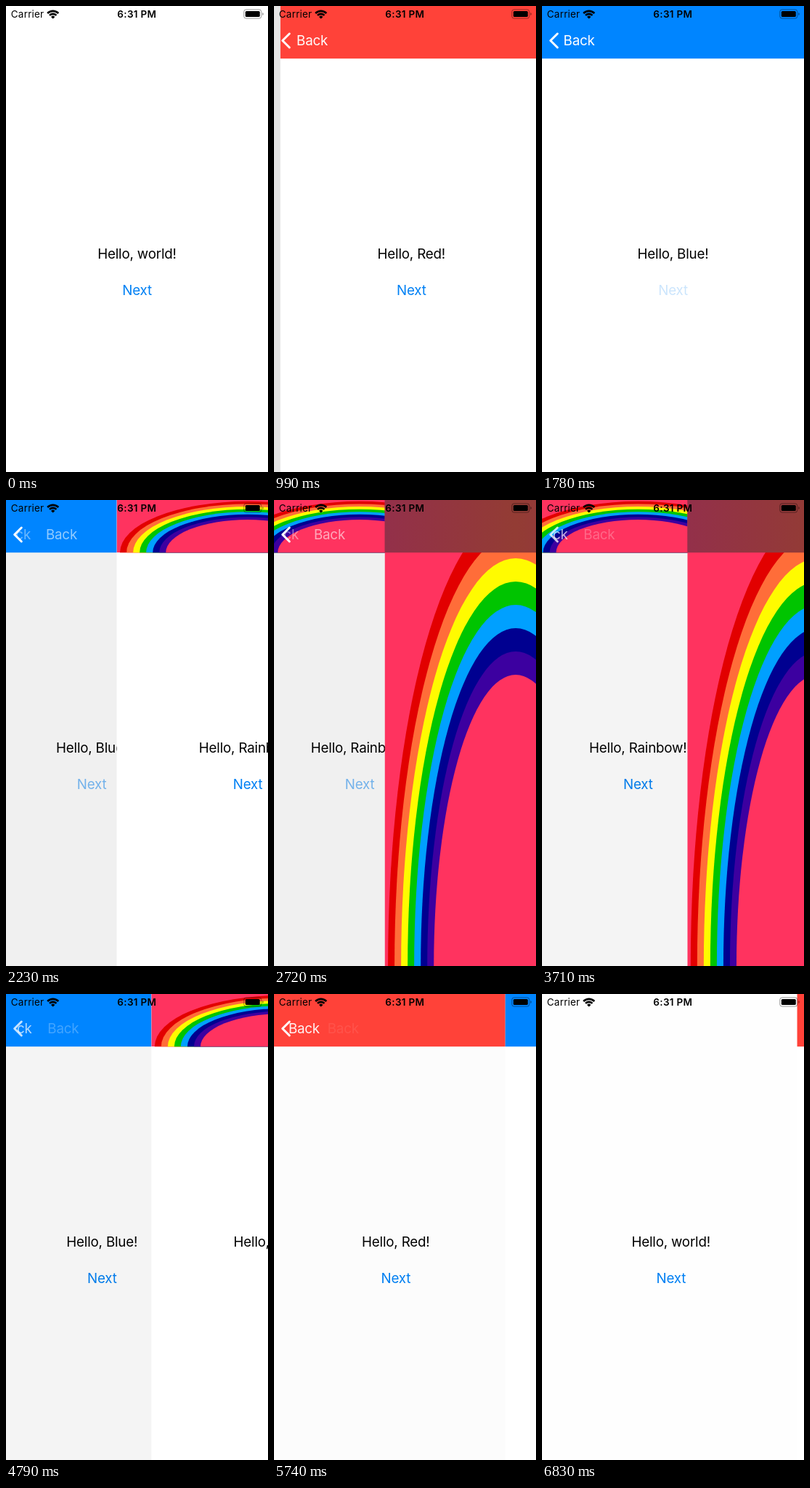
Recreate the animation shown at these times as an HTML page. Size 361 by 640 pixels, loop 6.93 s.

```html
<!DOCTYPE html>
<html lang="en">
<head>
<meta charset="utf-8">
<title>Navigation bar styles</title>
<style>
  html, body { margin: 0; width: 100%; height: 100%; overflow: hidden; background: #fff; }
  svg { display: block; }
  #stage { width: 361px; height: 640px; }
  text { font: 400 18.8px Inter, Roboto, sans-serif; letter-spacing: -.2px; }
  .mid { text-anchor: middle; }
  .next { fill: #0080f4; }
  .back { fill: #fff; }
  #status text { font-size: 13.5px; letter-spacing: .2px; }
  #status .clock { font-weight: 600; letter-spacing: .3px; }
</style>
</head>
<body>
<svg id="stage" viewBox="0 0 361 640">
  <defs>
    <symbol id="rainbow" viewBox="0 0 40 20" preserveAspectRatio="none">
      <rect width="40" height="20" fill="#ff335f"/>
      <g id="bands"></g>
    </symbol>
    <linearGradient id="smoke">
      <stop offset="0" stop-color="#93304a"/>
      <stop offset=".5" stop-color="#933c34"/>
      <stop offset="1" stop-color="#93304a"/>
    </linearGradient>
    <clipPath id="labels"><rect x="14" width="347" height="72"/></clipPath>
  </defs>

  <g id="pages"></g>

  <path id="chevron" d="M21.3 38L11.7 47.5L21.3 57" fill="none" stroke="#fff"
        stroke-width="3" stroke-linecap="round" stroke-linejoin="round"/>
  <g clip-path="url(#labels)">
    <text class="back" id="oldBack" y="54.3">Back</text>
    <text class="back" id="newBack" y="54.3">Back</text>
  </g>

  <g id="status">
    <text x="6.8" y="16.4">Carrier</text>
    <g fill="none" stroke="#000" stroke-width="2.6">
      <path d="M57.13 10.03A10.7 10.7 0 0 1 72.27 10.03"/>
      <path d="M59.96 12.86A6.7 6.7 0 0 1 69.44 12.86"/>
    </g>
    <path d="M64.7 17.6L62 14.9A3.8 3.8 0 0 1 67.4 14.9Z"/>
    <text class="mid clock" x="180.3" y="16.4">6:31 PM</text>
    <rect x="327.8" y="4.9" width="24" height="12.2" rx="3" fill="none" stroke="#000" stroke-opacity=".4"/>
    <rect x="329.8" y="6.9" width="20" height="8.2" rx="1.6"/>
    <path d="M353.3 9V13Q354.8 12.5 354.8 11T353.3 9Z" fill-opacity=".45"/>
  </g>
</svg>
<script>
const W = 361, H = 640, BAR = 72.2, LOOP = 6930, STEP = 110;
const $ = id => document.getElementById(id);

$('bands').innerHTML =
  ['#e20000', '#ff6d39', '#fffb00', '#00c400', '#00a0ff', '#000090', '#3c00a0', '#ff335f']
    .map((c, i) => `<circle cx="20" cy="20" r="${19.5 - i}" fill="${c}"/>`).join('');

const fill = paint => `<rect width="${W}" height="${BAR}" fill="${paint}"/>`;
const image = h => `<use href="#rainbow" width="${W}" height="${h}"/>`;
const hello = name => `<rect width="${W}" height="${H}" fill="#fff"/>
  <text class="mid" x="180.5" y="346.6">Hello, ${name}!</text>
  <text class="mid next" x="180.6" y="396.7">Next</text>`;

const pages = [
  [hello('world'), ''],
  [hello('Red'), fill('#ff4239')],
  [hello('Blue'), fill('#0085ff')],
  [hello('Rainbow'), image(BAR)],
  [image(H), fill('url(#smoke)')]
].map(([body, bar]) => {
  const el = document.createElementNS('http://www.w3.org/2000/svg', 'g');
  el.innerHTML = body + `<rect class="dim" width="${W}" height="${H}"/>` + bar;
  $('pages').append(el);
  return { el, dim: el.querySelector('.dim'), next: el.querySelector('.next') };
});

// press time, first step, from page, to page
const moves = [
  [330, 560, 0, 1],
  [1120, 1260, 1, 2],
  [1780, 2030, 2, 3],
  [2460, 2610, 3, 4],
  [3460, 3600, 4, 3],
  [4540, 4680, 3, 2],
  [5360, 5520, 2, 1],
  [6150, 6410, 1, 0]
];

// Critically damped spring, sampled once per step
function spring(step, lead) {
  if (step >= 4) return 1;
  const x = 1.83 * step + lead;
  return 1 - (1 + x) * Math.exp(-x);
}

function place(page, x, dim) {
  page.el.setAttribute('transform', `translate(${x.toFixed(2)} 0)`);
  page.el.style.display = x < W ? '' : 'none';
  page.dim.setAttribute('opacity', dim);
}

function label(el, x, alpha) {
  el.setAttribute('x', 29.6 + x);
  el.setAttribute('opacity', alpha);
}

function render(t) {
  const [press, start, from, to] = moves.findLast(m => m[0] <= t) || [0, 0, 1, 0];
  const push = to > from;
  // a few ms of slack keep a step from landing late
  const step = Math.floor((t - start + 5) / STEP);
  const p = t < moves[0][0] ? 1 : t < start ? 0 : spring(step, push ? .11 : .03);
  const cover = push ? p : 1 - p;
  const top = Math.max(from, to), under = Math.min(from, to);

  pages.forEach((page, i) => {
    if (i === top) place(page, W * (1 - cover), 0);
    else if (i === under && cover < 1) place(page, -.3 * W * cover, .1 * cover);
    else place(page, W, 0);
    if (page.next) page.next.setAttribute('opacity', push && i === from ? .2 + .55 * p : 1);
  });

  const seen = i => i > 0 ? 1 : 0;
  if (push) {
    label($('oldBack'), -67 * p, seen(from) * (1 - p));
    label($('newBack'), 60 * (1 - p), p);
    $('chevron').setAttribute('opacity', from ? 1 : p);
  } else {
    label($('oldBack'), 50 * p, (1 - p) * (.3 + .5 * p));
    label($('newBack'), -83 * (1 - p), seen(to) * p ** .6);
    $('chevron').setAttribute('opacity', Math.min(1, .3 + .85 * p) * (to ? 1 : 1 - p));
  }
}

const begin = performance.now();
function tick() {
  render((performance.now() - begin) % LOOP);
  requestAnimationFrame(tick);
}
tick();
</script>
</body>
</html>
```
